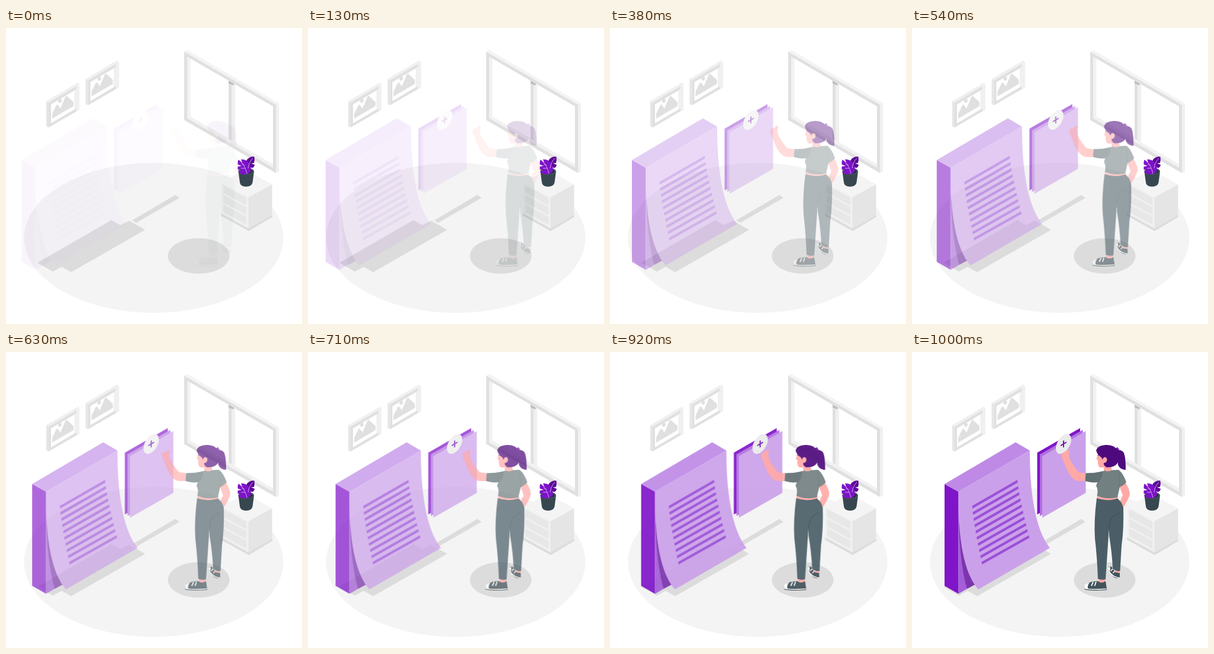
Recreate the animation shown at these times as an HTML page. Size 500 by 500 pixels, loop 1.04 s.

```html
<!DOCTYPE html>
<html lang="en">
<head>
<meta charset="utf-8">
<title>Adding a page</title>
<style>
  html, body { margin: 0; width: 100%; height: 100%; overflow: hidden; background: #fff; }
  svg { display: block; width: 100vw; height: 100vh; }
  .slide { animation: slide 1040ms steps(25, start) -4ms infinite; }
  #paper { --from: -30px; }
  #woman { --from: 30px; }
  @keyframes slide {
    from { transform: translateX(var(--from)); opacity: 0; }
    to { transform: translateX(0); opacity: 1; }
  }
</style>
</head>
<body>
<svg viewBox="0 0 500 500">
  <defs>
    <g id="picture">
      <path fill="#f0f0f0" d="M68 123.500 121 92.500 124 94.500 72 126z"/>
      <path fill="#e6e6e6" d="M68 123.500 72 126V168L68 166z"/>
      <path fill="#e0e0e0" d="M72 126 124 95V138L72 168z"/>
      <path fill="#f0f0f0" d="M119 98 124 95V138L119 141z"/>
      <path fill="#fff" d="M76 129 119 103.500V135.500L76 161z"/>
      <path fill="#f0f0f0" d="M115.500 105.500 119 103.500V135.500L115.500 137.500z"/>
      <path fill="#e0e0e0" d="M78 153V145L85 130.500Q87 128 89 132L92 136 100 117Q102 113 104 116L114 125V132z"/>
      <ellipse cx="91" cy="123" rx="2.800" ry="3.600" fill="#e0e0e0" transform="rotate(25 91 123)"/>
    </g>
  </defs>

  <ellipse cx="249.500" cy="354.500" rx="219" ry="126.700" fill="#f4f4f4"/>
  <g fill="#dcdcdc">
    <path d="M53 396.500 178 324.500 193 333 208 325.500 235 341 110 412.500 94 403.500 79 411.500z"/>
    <path d="M213 325 286 282 293 287 220 329z"/>
    <ellipse cx="325.500" cy="385" rx="52" ry="30"/>
  </g>

  <use href="#picture"/>
  <use href="#picture" x="66.500" y="-37.500"/>

  <g id="window">
    <path fill="#f4f4f4" d="M301 40 306 37 461 127 456 129.500z"/>
    <path fill="#f0f0f0" d="M456 129.500 461 127V242.500L456 245z"/>
    <path fill="#e0e0e0" d="M301 40 456 129.500V245L301 155.500z"/>
    <path fill="#f2f2f2" d="M306 48.500 451 132.500V236L306 152.500z"/>
    <path fill="#fff" d="M311.500 51.700 451 132.500V230L311.500 149.500z"/>
    <path fill="#e0e0e0" d="M376 89 381.500 92.200V190L376 187z"/>
    <path fill="#f0f0f0" d="M381.500 92.200 387 95.500V193L381.500 190z"/>
    <path fill="#bdbdbd" d="M376 89 385 94.200 384 97 376 93.500z"/>
  </g>

  <g id="cabinet">
    <path fill="#dcdcdc" d="M363 313 410 338 450 315V319L410 343 363 317z"/>
    <path fill="#f4f4f4" d="M364 262 404 239 449 264 409.500 286z"/>
    <path fill="#f0f0f0" d="M364 262 409.500 286V338.500L364 313.500z"/>
    <path fill="#e5e5e5" d="M409.500 286 449.500 264V316L409.500 339z"/>
    <g id="drawers" fill="#e7e7e7"></g>
  </g>

  <g id="plant">
    <path fill="#37474f" d="M392.500 242H419L416.500 261Q415 268 405.500 268T395 261z"/>
    <ellipse cx="405.700" cy="242" rx="13.200" ry="6" fill="#455a64"/>
    <ellipse cx="405.700" cy="242.200" rx="11" ry="4.600" fill="#263238"/>
    <path fill="#5c0a98" d="M406 241Q402 229 408 221 414 216 419.500 217.500 420.500 223 419 228L414 228.500 420 231Q419.500 235 416 236.500L411 234.500 414 238Q411 241 406 241z"/>
    <path fill="#7d12c9" d="M405 247Q396 248 392 243L399 239 391.500 239.500V234L398 233 391.500 230.500Q391 226 392.500 222.500L399 227 397 222Q406 221 411 229 415 237 413 243 409 247 405 247z"/>
    <path fill="none" stroke="#e2c7f5" stroke-width=".8" d="M395 224Q404 232 407 246M417 220Q410 227 409 237M404 237 397 237M403 232 398 229.500"/>
  </g>

  <g id="paper" class="slide">
    <path fill="#8014c9" d="M55 223 78.500 236V408.500L55 395z"/>
    <path fill="#be8ae6" d="M55 223 175 152.500 199 166.500 78.500 236z"/>
    <path fill="#a45ed9" d="M78.500 236 120 260V384L78.500 408.500z"/>
    <path fill="#7d35ae" d="M79 290Q82 365 93 400L112 390 100 330z"/>
    <path fill="#cba0ea" d="M78.500 236 199 166.500C199 230 206 297 233 331L112 401C88 374 77 315 78.500 236z"/>
    <g id="lines" fill="#9b50d7"></g>

    <path fill="#8014c9" d="M211.500 170 284 128.500V233L211.500 274.500z"/>
    <path fill="#b06fe0" d="M216 173 288.500 131.500V235.500L216 277z"/>
    <path fill="#cba0ea" d="M220 176 293.500 133.500V238L220 280z"/>
    <g transform="matrix(.866 -.5 0 1 256 155.300)">
      <circle r="15" fill="#ebebeb"/>
      <path stroke="#7011b3" stroke-width="2.300" d="M-5.700 0H5.700M0-5.700V5.700"/>
    </g>
  </g>

  <g id="woman" class="slide">
    <g fill="#ffa9a7">
      <path d="M350 226 361 221Q367 231 368 239 368 245 358 261L350 265Q348 258 356 242z"/>
      <path d="M315 380H326.500V391H315z"/>
      <path d="M341 364 351 366V377L343 374z"/>
      <path d="M313 240H347L349 252H312z"/>
    </g>

    <path fill="#4b5e67" d="M333 275 357 262Q358 300 354 327L351.500 370Q345 371 339 366 338 340 333 310z"/>
    <path fill="#4b5e67" d="M312 247Q330 253 347 247.500 356 254 357 265 353 274 339 277 333 285 332 310L327 384Q320 386 314 383 313 350 309 315 307 285 312 247z"/>
    <path fill="none" stroke="#3a4b54" d="M350 272Q339 276 336 282 333 290 333 304"/>

    <path fill="#43535b" d="M291 396Q293 391 304 388L314 387Q320 392 327 387L329 400Q314 403.500 299 402 291 401 291 396z"/>
    <path fill="#fff" d="M291 395Q293 391 300 389.500 296 394 297 400.500 291 400 291 395z"/>
    <path fill="none" stroke="#fff" stroke-width="1.800" d="M303 395 306 388.500M308.500 395 311 388M291.500 399Q299 402.500 328 400.500"/>
    <path fill="none" stroke="#263238" d="M291.500 400.500Q301 403.500 329 401.500"/>
    <path fill="#43535b" d="M331 367Q330 362 337 362.500L343 372 351 373.500V381Q345 384.500 339 378.500z"/>
    <path fill="#fff" d="M331 367Q330.500 362.500 335 363.500L334.500 371z"/>
    <path fill="none" stroke="#fff" stroke-width="1.500" d="M336 370 339 366M339.500 373.500 342 370.500M332 370Q340 381 350.500 381.500"/>

    <path fill="#ffa9a7" d="M293.500 205 281.500 203Q271 191 266 180L264.500 172Q267 168 265.500 165.500 263 164 261 167.500L253 171Q251.500 178 256 184 261 199 267 208 274 218 283 218L294 218z"/>
    <path fill="#ffa9a7" d="M324 188H336L338 204Q330 207 324 202z"/>
    <path fill="#738082" d="M319 202 326 200.500Q332 203 338 199.500L349 199Q357 205 362 220 357 226 351 228L347 245.500Q330 250 312.500 243 315 233 311 226z"/>
    <path fill="#617073" d="M322 201.500Q307 205 293.500 204.500L292.500 218Q305 222 315 219.500 322 213 322 201.500z"/>
    <path fill="none" stroke="#667578" d="M349 204Q351 216 350.500 228"/>

    <path fill="#4e0a7c" d="M346 166Q352 164 357 169 361 175 361 199 352 199 348 191z"/>
    <path fill="#6f1aa6" d="M344 163 347 160.500 350 165 347 168z"/>
    <path fill="#ffa9a7" d="M315 167Q314 174 311.500 180.500L314 183Q313.500 190 316 194 320 197 328 193L336 180 327 166z"/>
    <path fill="#4e0a7c" d="M311 166Q313 158 327 157 342 156 348 167 352 180 347 188 341 196 328 194.500 323 191 324 187L320 178Q313 174 311 166z"/>
    <ellipse cx="325.500" cy="182.500" rx="3.800" ry="5" fill="#ffa9a7" transform="rotate(15 325.500 182.500)"/>
    <path fill="none" stroke="#4e0a7c" d="M313.500 174.500 317 173.500"/>
  </g>
</svg>
<script>
  const addPaths = (id, count, shape) => {
    document.getElementById(id).innerHTML =
      Array.from({ length: count }, (_, i) => `<path d="${shape(i)}"/>`).join('');
  };

  addPaths('drawers', 3, i => {
    const y = 265.5 + i * 16.3;
    return `M367 ${y} 406 ${y + 21}v13L367 ${y + 13}z`;
  });

  // Text rows follow the curl of the sheet.
  addPaths('lines', 10, i => {
    const u = i / 9;
    const left = 101.5 + 16 * u ** 1.25;
    const right = 178 + 19.5 * u ** 1.25;
    const y = 260 + 94.5 * u;
    const end = 216 + 93.5 * u;
    return `M${left} ${y} ${right} ${end}l.7 4.5L${left + .7} ${y + 4.5}z`;
  });
</script>
</body>
</html>
```
